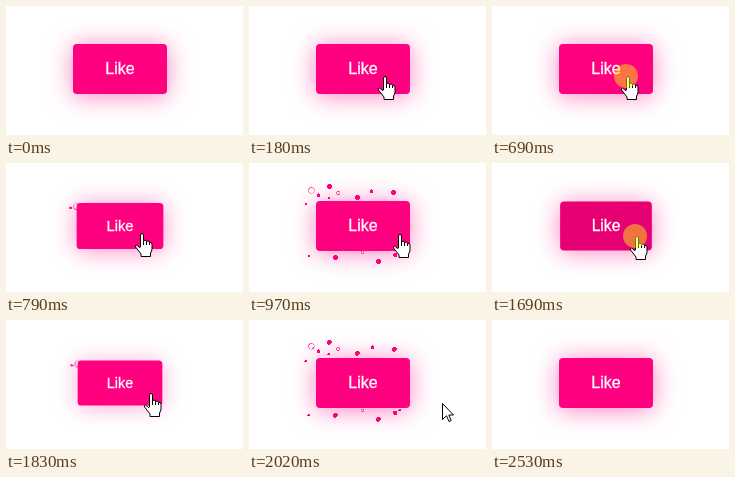
Write an HTML page that moves like this. It is 237 by 129 pixels and loops after 2860 ms.

```html
<!DOCTYPE html>
<html lang="en">
<head>
<meta charset="utf-8">
<title>Bubbly button</title>
<style>
  html, body { margin: 0; width: 100%; height: 100%; overflow: hidden; background: #fff; }
  body { position: relative; }
  #button { position: absolute; left: 67px; top: 38px; width: 94px; height: 50px; }
  #face {
    position: absolute; inset: 0; border-radius: 4px;
    background: #ff0081; color: #fff; text-align: center;
    font: 16px/50px "Liberation Sans", Arial, sans-serif;
    -webkit-text-stroke: .3px #fff;
  }
  .bubbles {
    position: absolute; left: -18.7px; width: 130.7px; height: 50px;
    background-repeat: no-repeat; opacity: 0;
  }
  #top { top: -37.5px; }
  #bottom { bottom: -37.5px; }
  #cursor { position: absolute; left: 0; top: 0; width: 1px; height: 1px; overflow: visible; }
  #cursor path { fill: #fff; stroke: #000; stroke-linejoin: round; }
</style>
</head>
<body>
<div id="button">
  <div class="bubbles" id="top"></div>
  <div class="bubbles" id="bottom"></div>
  <div id="face">Like</div>
</div>
<svg id="cursor">
  <path id="arrow" d="M.5 .5V16.5L4.5 12.8L7 18.5L9.2 17.6L6.8 12H11.5Z"/>
  <g id="hand" transform="translate(-6 0)">
    <path d="M5.5 14V2a1.5 1.5 0 0 1 3 0V7.5q3-1 3 .8q3-.8 3 1q2.5-.5 2.5 2V16q0 2-1.5 4v3.5h-9.5v-2.5l-5.4-7q-.8-1.6 .6-2q1 0 3 2.5z"/>
    <path d="M8.5 7.5v4.5M11.5 8.3v3.7M14.5 9.3v2.7"/>
  </g>
  <circle id="halo" cx="-1" r="12" fill="rgba(255,255,0,.45)"/>
</svg>
<script>
const LOOP = 2860;
const CLICKS = [{ down: 698, up: 785 }, { down: 1648, up: 1827 }];
const PINK = '#ff0081', DARK = '#e60074';
const $ = id => document.getElementById(id);
const running = [];

// steps: [ms, properties, easing]
function play(el, steps) {
  const frames = steps.map(([ms, props, easing = 'linear']) => ({ offset: ms / LOOP, ...props, easing }));
  running.push(el.animate(frames, { duration: LOOP, iterations: Infinity }));
}

// Eases towards style(1) while held, then back the same way
function press(el, ms, style) {
  const rest = style(0);
  play(el, [[0, rest], ...CLICKS.flatMap(({ down, up }) => {
    const held = Math.min(ms, up - down);
    const peak = style((held / ms) ** 1.8);
    return [[down, rest, 'ease-in'], [down + held, peak], [up, peak, 'ease-in'], [up + held, rest]];
  }), [LOOP, rest]]);
}

const dot = `radial-gradient(circle, ${PINK} 20%, transparent 20%)`;
const ring = `radial-gradient(circle, transparent 20%, ${PINK} 20%, transparent 30%)`;
const softRing = `radial-gradient(circle, transparent 10%, ${PINK} 15%, transparent 20%)`;
const SIZES = [10, 20, 15, 20, 18];

// Each burst flies from the button edge to its points, then drifts on and shrinks away
function burst(el, points, startX, startY, drift, rings) {
  const list = fn => points.map(([x, y], i) => fn(x, y, i).map(n => n + '%').join(' ')).join(', ');
  const at = fn => ({ backgroundPosition: list(fn) });
  const size = k => ({ backgroundSize: list((x, y, i) => Array(2).fill(k * SIZES[i % SIZES.length])) });
  el.style.backgroundImage = points.map((p, i) => rings[i] || dot).join(', ');
  play(el, CLICKS.flatMap(({ up }) => [
    [up, { ...at(x => [startX(x), startY]), ...size(1) }, 'ease-in-out'],
    [up + 375, at((x, y) => [x, y]), 'ease-in-out'],
    [up + 750, { ...at((x, y) => [x, y + drift]), ...size(0) }]
  ]));
  play(el, CLICKS.flatMap(({ up }) => [
    [up, { opacity: 1 }, 'step-end'],
    [up + 700, { opacity: 0 }, 'step-end']
  ]).concat([[LOOP, { opacity: 0 }]]).toSpliced(0, 0, [0, { opacity: 0 }, 'step-end']));
}

burst($('top'),
  [[0, 80], [0, 20], [10, 40], [20, 0], [30, 30], [22, 50], [50, 50], [65, 20], [90, 30]],
  x => 5 + .7 * x, 90, -10, { 1: ring, 4: softRing });
burst($('bottom'),
  [[0, 80], [20, 80], [45, 60], [60, 100], [75, 70], [95, 60], [105, 0]],
  x => 85 - Math.abs(75 - x), -10, 10, { 2: softRing });

press($('button'), 100, k => ({ transform: `scale(${1 - .1 * k})` }));
press($('face'), 250, k => ({ boxShadow: `0 2px 25px rgba(255, 0, 130, ${.5 - .3 * k})` }));

// Pointer: glides between a few stops
const ENTER = { x: 183, y: 114, at: 40 };
const GLIDES = [
  { from: 40, to: 180, x: 135, y: 70 },
  { from: 880, to: 1160, x: 197, y: 76 },
  { from: 1400, to: 1600, x: 144, y: 73 },
  { from: 1850, to: 2190, x: 242, y: 93 }
];

function pointerAt(t) {
  let { x, y } = ENTER;
  for (const g of GLIDES) {
    const p = Math.min(1, Math.max(0, (t - g.from) / (g.to - g.from)));
    const k = p * p * (3 - 2 * p);
    x += (g.x - x) * k;
    y += (g.y - y) * k;
  }
  return [Math.round(x), Math.round(y)];
}

const show = (id, on) => { $(id).style.display = on ? '' : 'none'; };
const start = document.timeline.currentTime ?? 0;
running.forEach(a => { a.startTime = start; });

function draw() {
  const t = Math.max(0, document.timeline.currentTime - start) % LOOP;
  const [x, y] = pointerAt(t);
  const over = x >= 67 && x < 161 && y >= 38 && y < 88;
  $('cursor').style.transform = `translate(${x}px, ${y}px)`;
  show('hand', over);
  show('arrow', !over && t >= ENTER.at);
  show('halo', CLICKS.some(c => t >= c.down - 10 && t < c.up));
  $('face').style.background = CLICKS.some(c => t >= c.down && t < c.up) ? DARK : PINK;
  requestAnimationFrame(draw);
}
draw();
</script>
</body>
</html>
```
